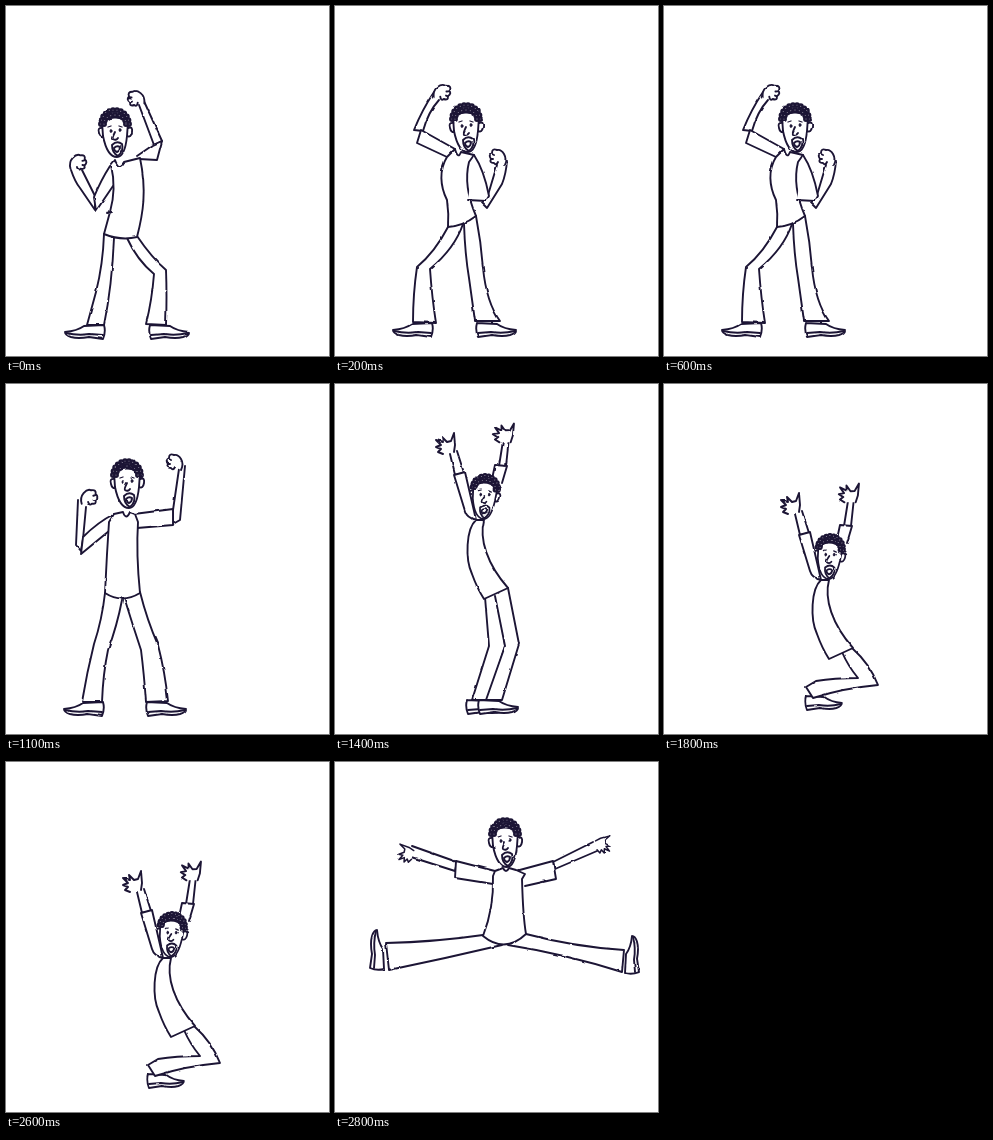
An HTML page that plays this animation: 323 by 350 pixels, repeating every 2.9 s.

```html
<!DOCTYPE html>
<html lang="en">
<head>
<meta charset="utf-8">
<title>Dancing man</title>
<style>
  html, body { margin: 0; width: 100%; height: 100%; overflow: hidden; background: #fff; }
  svg { display: block; width: 100%; height: 100%; }
  .pose { visibility: hidden; filter: url(#wobble); }
  .pose * { stroke: #1c1535; stroke-width: 1.9; stroke-linejoin: round; stroke-linecap: round; }
  .pose .ink { fill: #1c1535; stroke-width: 1; }
  .pose .thin { stroke-width: 1.3; }
  .pose .curl { stroke-width: 2.5; }
</style>
</head>
<body>
<svg id="stage" viewBox="0 0 323 350" fill="#fff"></svg>
<script>
const LOOP = 2900;

const path = (d, cls = '') => `<path class="${cls}" d="${d}"/>`;
const line = d => `<path fill="none" d="${d}"/>`;
const group = (transform, ...parts) => `<g transform="${transform}">${parts.join('')}</g>`;
const place = (x, y, turn = 0, sx = 1, sy = 1) =>
  `translate(${x} ${y}) rotate(${turn}) scale(${sx} ${sy})`;

// Two rows of small rings make the curly hair.
function curls() {
  let out = '';
  for (const [count, rx, ry] of [[12, 14, 14], [9, 11, 9]]) {
    for (let i = 0; i < count; i++) {
      const a = Math.PI * (1 + i / (count - 1));
      const x = rx * Math.cos(a), y = 16 + ry * Math.sin(a);
      out += `<circle class="curl" cx="${x.toFixed(1)}" cy="${y.toFixed(1)}" r="1.7"/>`;
    }
  }
  return out;
}

// Origin: middle of the hair top.
const HEAD =
  path('M-12 20Q-18 19 -16 25Q-15 30 -11 29M13 20Q18 18 17 24Q16 30 12 28') +
  path('M-13 14L-12 28C-10 38 -6 49 2 49C9 49 11 38 12 28L13 14Q0 5 -13 14') +
  curls() +
  path('M-7 19L-4 18M4 18L7 19', 'thin') +
  '<ellipse class="ink" cx="-4" cy="23" rx=".9" ry="1.5"/><ellipse class="ink" cx="5" cy="22" rx=".9" ry="1.5"/>' +
  path('M0 24Q-3 30 -2 31Q1 33 3 30') +
  path('M-3 37Q2 32 7 36Q9 43 3 48Q-3 45 -3 37') +
  path('M-1 40Q2 37 5 39Q5 43 2 44Q-1 43 -1 40');

// Origin: middle of the hand, wrist below.
const FIST =
  path('M-6 8Q-9 2 -6 -3Q-3 -8 1 -7Q6 -9 6 -4Q10 -2 7 2Q9 6 4 6Q2 9 0 5') +
  line('M6 -3L4 -2M7 2L5 2');
const HAND = path('M-3 9L-8 7L-5 4L-10 2L-5 0L-10 -5L-3 -3L-4 -8L1 -3L5 -4L8 -12L9 0L8 7');

// Origin: top of the heel, toe to the right.
const SHOE = path('M0 0L20 1Q27 6 39 7Q39 10 33 12Q26 14 15 12L1 14Q-2 7 0 0') +
  line('M1 10L14 9Q26 11 38 8');

const head = (...at) => group(place(...at), HEAD);
const fist = (...at) => group(place(...at), FIST);
const hand = (...at) => group(place(...at), HAND);
const shoe = (...at) => group(place(...at), SHOE);

const leftPunch = [
  path('M98 228Q97 258 90 286L81 319H98Q106 280 108 232'),
  path('M131 230Q146 252 160 264Q161 290 160 319L140 318Q146 294 148 268Q131 254 121 232'),
  shoe(98, 319, 0, -1), shoe(144, 319),
  path('M137 93L156 135L148 139L133 99'),
  path('M131 150L147 139L156 135L151 154L133 153'),
  path('M65 164Q69 176 74 182L89 204L89 190L76 164'),
  path('M104 160Q95 174 88 191L90 205L107 180'),
  path('M105 159C109 176 108 192 104 206L98 228Q115 235 131 231C137 208 141 185 134 152L118 156Q113 165 109 154Z'),
  line('M101 207L106 206'),
  head(109, 102), fist(130, 92, -20, -1), fist(72, 156, 12)
].join('');

const rightPunch = [
  path('M113 221Q100 246 82 261Q78 288 78 316L101 317Q97 292 95 263Q120 242 128 218'),
  path('M129 218Q130 248 134 272L140 315H165C154 300 150 282 148 262Q146 236 141 210'),
  shoe(97, 317, 0, -1), shoe(142, 317),
  path('M99 86Q87 104 79 124L88 125Q93 106 104 94'),
  path('M120 143L86 124L82 137L112 151'),
  path('M120 143L112 151C104 164 105 180 112 194Q114 208 113 221Q128 220 141 210Q128 180 134 156L139 149L126 146Q123 154 120 143'),
  path('M172 155Q171 168 167 178L152 202L147 197L153 189L162 159'),
  path('M139 149Q149 164 154 190L151 195L133 194'),
  head(131, 97), fist(107, 86, 20), fist(163, 151, 0, -1)
].join('');

const flex = [
  path('M99 209Q96 236 88 260Q81 288 76 318H96Q97 290 102 266Q111 242 116 216'),
  path('M119 216Q127 242 135 266Q138 290 140 318L162 317Q159 288 152 261Q141 236 134 208'),
  shoe(97, 318, 0, -1), shoe(141, 318),
  path('M179 82L174 136L167 140V126L173 85'),
  path('M128 130L167 125V141L131 144'),
  path('M72 116Q71 140 70 161L75 167L77 155L80 123'),
  path('M108 130Q92 138 77 153L75 170L103 147'),
  path('M108 130L103 138L101 170L99 209Q116 220 134 209Q130 170 132 138L129 130L124 128Q120 137 117 128Z'),
  head(121, 75), fist(169, 78, 0, -1), fist(83, 113, 10)
].join('');

const split = [
  path('M148 173Q100 180 51 181L54 208Q112 196 167 183'),
  path('M191 172Q240 185 289 188L287 210Q230 192 173 183'),
  shoe(49, 207, -90, 1, -1), shoe(290, 211, -90, .95),
  path('M77 84L122 100L120 109L76 95'),
  path('M258 80L218 100L220 107L262 89'),
  path('M160 109L121 99L120 116L158 122'),
  path('M181 109L218 99L221 117L190 124'),
  path('M160 109L158 114Q159 146 148 174Q170 192 191 172Q188 155 187 117L190 112L181 108L174 106Q171 112 168 106Z'),
  head(170, 56), hand(71, 92, -65, .8, .8), hand(268, 83, 70, -.8, .8)
].join('');

// Upper body with raised arms, seen half from the side.
const armsUp = [
  path('M131 130L136 151L145 149L138 127'),
  path('M184 117L180 142H187L190 114'),
  path('M173 155L176 141L188 142L183 159'),
  path('M157 196C147 205 146 235 153 250Q158 264 165 275L189 264C168 240 160 215 165 196Z'),
  head(168, 150, 7, .93, .92),
  path('M135 151L146 148L155 187L157 196Q148 194 146 187Z'),
  hand(127, 121), hand(185, 110, 10)
].join('');

const kneelLegs =
  shoe(142, 312, 0, .92, 1) +
  path('M178 268Q184 282 194 294Q170 294 152 297L142 303L149 314Q180 304 214 301Q206 280 188 264');

const standLegs = shoe(134, 316) + shoe(146, 316) +
  path('M151 207L147 260L138 316H155L162 262L165 205') +
  path('M161 206L163 260L154 316H172L176 258L175 198');

const bentLegs = shoe(132, 316) + shoe(144, 316) +
  path('M150 213L154 262L137 316H153L170 262L164 210') +
  path('M160 212L170 262L151 316H167L184 260L173 204');

const deepLegs = shoe(130, 316) + shoe(143, 316) +
  path('M145 212L172 264L137 316H153L187 264L160 208') +
  path('M154 210L184 265L150 316H166L200 263L167 202');

const poses = {
  leftPunch, rightPunch, flex, split,
  leap: group('translate(-31.5 -43.4) scale(1.044)', split),
  reach: standLegs + group('translate(-14 -66)', armsUp),
  dip: bentLegs + group('translate(-16 -60)', armsUp),
  leanBack: deepLegs + group('translate(-22 -62) rotate(-5 180 270)', armsUp),
  kneel: kneelLegs + armsUp,
  rock: kneelLegs + group('rotate(25 180 270)', armsUp)
};

const steps = [
  [0, 'leftPunch'], [100, 'flex'], [200, 'rightPunch'], [300, 'flex'],
  [400, 'leftPunch'], [500, 'flex'], [600, 'rightPunch'], [700, 'flex'],
  [800, 'leap'], [1100, 'flex'],
  [1200, 'reach'], [1400, 'dip'], [1600, 'leanBack'],
  [1800, 'kneel'], [2000, 'rock'], [2200, 'kneel'], [2400, 'rock'], [2600, 'kneel'],
  [2800, 'split']
];

// A slight displacement gives the lines a pen-drawn edge.
const wobble = `<filter id="wobble" filterUnits="userSpaceOnUse" x="0" y="0" width="323" height="350"
  color-interpolation-filters="sRGB">
  <feTurbulence type="fractalNoise" baseFrequency=".09" numOctaves="2" seed="4"/>
  <feDisplacementMap in="SourceGraphic" scale="2.2" xChannelSelector="R" yChannelSelector="G"/>
</filter>`;

const stage = document.getElementById('stage');
stage.innerHTML = wobble + Object.entries(poses)
  .map(([name, art]) => `<g class="pose" id="${name}">${art}</g>`).join('');

let shown = null;
function draw() {
  const t = performance.now() % LOOP;
  const name = steps.findLast(([start]) => start <= t)[1];
  if (name !== shown) {
    if (shown) document.getElementById(shown).style.visibility = 'hidden';
    document.getElementById(name).style.visibility = 'visible';
    shown = name;
  }
  requestAnimationFrame(draw);
}
draw();
</script>
</body>
</html>
```
